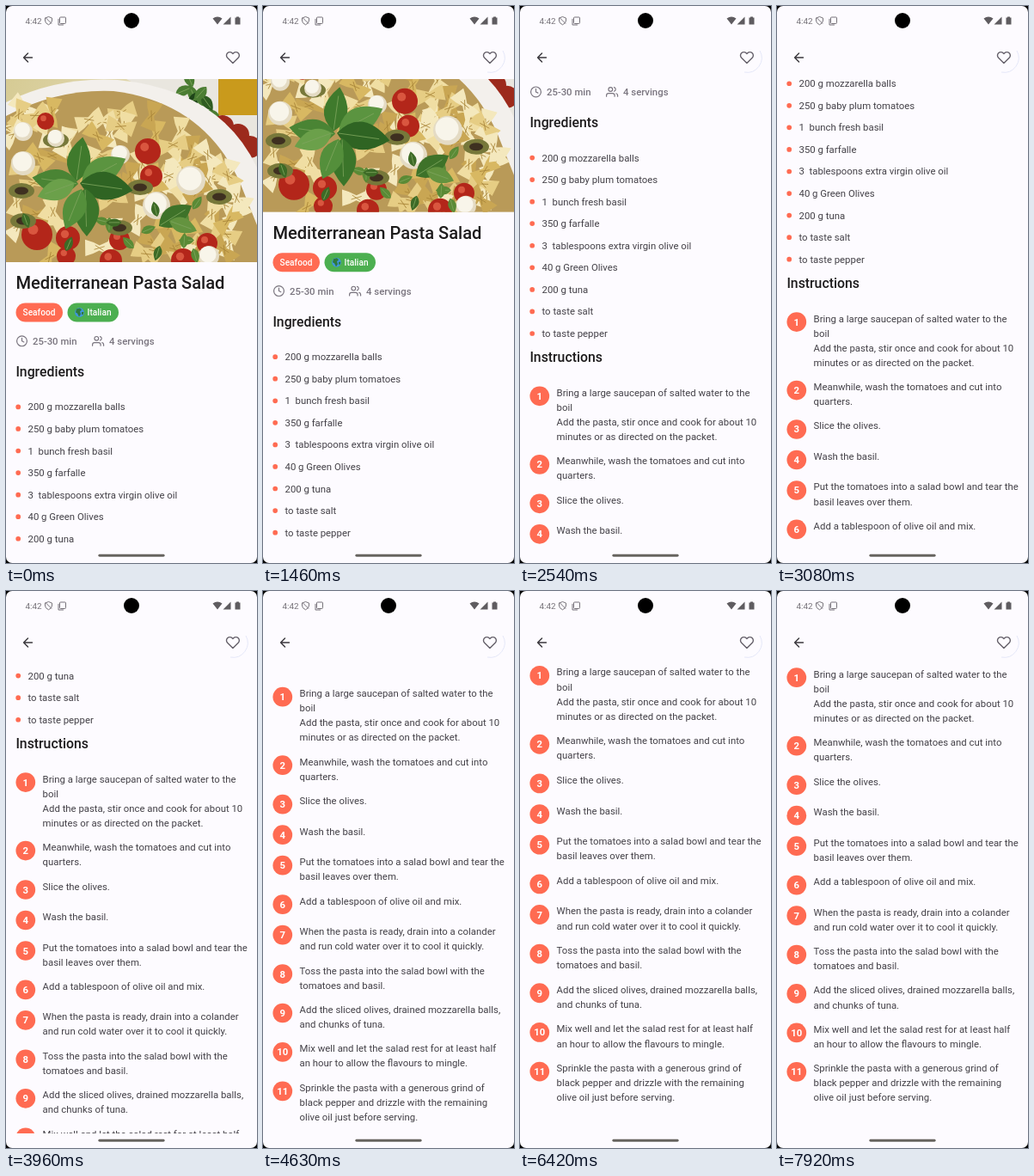
Animation, 292 px wide and 648 px high, one loop 8000 ms. Source, as an HTML page:

```html
<!DOCTYPE html>
<html lang="en">
<head>
<meta charset="utf-8">
<title>Recipe scroll</title>
<style>
  html, body { margin: 0; width: 100%; height: 100%; overflow: hidden; background: #000; }
  svg { display: block; font-family: Roboto, sans-serif; }
  text { font-size: 11.36px; fill: #434047; white-space: pre; }
  .title { font-size: 20.1px; font-weight: 500; fill: #1d1b1c; }
  .head { font-size: 15.8px; font-weight: 500; fill: #1d1b1c; }
  .meta { font-weight: 500; fill: #79747e; }
  .badge { font-size: 10.1px; font-weight: 500; fill: #fff; }
  .num { font-weight: 700; fill: #fff; text-anchor: middle; }
  .clock { font-size: 9.94px; fill: #77737a; }
  .line { fill: none; stroke-width: 2; stroke-linecap: round; stroke-linejoin: round; }
</style>
</head>
<body>
<svg width="292" height="648" viewBox="0 0 292 648">
  <defs>
    <clipPath id="view"><rect y="85" width="292" height="546"/></clipPath>
    <clipPath id="frame"><rect y="85" width="292" height="213"/></clipPath>
    <linearGradient id="table" x2="1" y2=".3">
      <stop stop-color="#d6cb94"/><stop offset="1" stop-color="#ece5cf"/>
    </linearGradient>
  </defs>
  <rect width="292" height="648" rx="7" fill="#fdfbff"/>

  <g clip-path="url(#view)"><g id="page">
    <g id="photo" clip-path="url(#frame)"></g>
    <text class="title" x="11.4" y="329">Mediterranean Pasta Salad</text>
    <rect x="11.5" y="345.5" width="54.5" height="22" rx="11" fill="#ff6b52"/>
    <text class="badge" x="19.6" y="360">Seafood</text>
    <rect x="71.5" y="345.5" width="59.5" height="22" rx="11" fill="#4caf50"/>
    <circle cx="85.5" cy="356.5" r="5.4" fill="#3f95dc"/>
    <path d="M82 352.5l4-1 2 2-2 2 1 3-2 3-2-4-2-1zM88 356l2.5 0-1 3-1.5 0z" fill="#2f7a3c"/>
    <text class="badge" x="94.6" y="360">Italian</text>
    <g class="line" stroke="#79747e" transform="translate(11.4 382.7) scale(.592)">
      <circle cx="12" cy="12" r="10"/><path d="M12 6v6l4 2"/>
    </g>
    <text class="meta" x="31" y="394">25-30 min</text>
    <g class="line" stroke="#79747e" transform="translate(100 382.7) scale(.592)">
      <path d="M17 21v-2a4 4 0 0 0-4-4H5a4 4 0 0 0-4 4v2M23 21v-2a4 4 0 0 0-3-3.87M16 3.13a4 4 0 0 1 0 7.75"/>
      <circle cx="9" cy="7" r="4"/>
    </g>
    <text class="meta" x="120" y="394">4 servings</text>
    <text class="head" x="11.4" y="431">Ingredients</text>
    <text class="head" x="11.4" y="704">Instructions</text>
  </g></g>

  <text class="clock" x="22.5" y="21">4:42</text>
  <g fill="none" stroke="#77737a">
    <path d="M49.5 12.5l4 1.5v3q0 3-4 4.8-4-1.8-4-4.8v-3zM46 13.5l7 7"/>
    <rect x="62.5" y="13" width="7" height="7.5" rx="1"/><path d="M61 15v7h6"/>
  </g>
  <circle cx="146" cy="17" r="9"/>
  <path d="M240.5 14.5q5.5-4 11 0l-5.5 7zM261.5 12.5v9h-9zM266.5 13.5h1.5v-1h3v1h1.5v8h-6z" fill="#5f5c60"/>
  <path class="line" stroke="#3a373d" transform="translate(17 51.5) scale(.71)" d="M19 12H5M12 19l-7-7 7-7"/>
  <path id="halo" d="M279 52a17 17 0 0 1-18 25" fill="none" stroke="#dfe3f6" stroke-width=".8"/>
  <path class="line" stroke="#66616b" transform="translate(255.4 51.5) scale(.71)"
    d="M20.84 4.61a5.5 5.5 0 0 0-7.78 0L12 5.67l-1.06-1.06a5.5 5.5 0 0 0-7.78 7.78L12 21.23l8.84-8.84a5.5 5.5 0 0 0 0-7.78z"/>
  <rect x="107.4" y="637.8" width="77.2" height="2.9" rx="1.4" fill="#67645f"/>
</svg>

<script>
const page = document.getElementById('page');
const photo = document.getElementById('photo');
const halo = document.getElementById('halo');
const CORAL = '#ff6b52';

const add = (parent, markup) => parent.insertAdjacentHTML('beforeend', markup);
const dot = (x, y, r, fill) => `<circle cx="${x}" cy="${y}" r="${r}" fill="${fill}"/>`;
const label = (x, y, text, cls = '') => `<text class="${cls}" x="${x}" y="${y}">${text}</text>`;

// Ingredients
['200 g mozzarella balls', '250 g baby plum tomatoes', '1\u00a0 bunch fresh basil',
 '350 g farfalle', '3\u00a0 tablespoons extra virgin olive oil', '40 g Green Olives',
 '200 g tuna', 'to taste salt', 'to taste pepper'].forEach((item, i) => {
  const y = 466.4 + i * 25.56;
  add(page, dot(14.2, y, 2.85, CORAL) + label(25.5, y + 4, item));
});

// Numbered steps; each is as tall as its text or its badge
let stepY = 739.7;
['Bring a large saucepan of salted water to the|boil|Add the pasta, stir once and cook for about 10|minutes or as directed on the packet.',
 'Meanwhile, wash the tomatoes and cut into|quarters.',
 'Slice the olives.',
 'Wash the basil.',
 'Put the tomatoes into a salad bowl and tear the|basil leaves over them.',
 'Add a tablespoon of olive oil and mix.',
 'When the pasta is ready, drain into a colander|and run cold water over it to cool it quickly.',
 'Toss the pasta into the salad bowl with the|tomatoes and basil.',
 'Add the sliced olives, drained mozzarella balls,|and chunks of tuna.',
 'Mix well and let the salad rest for at least half|an hour to allow the flavours to mingle.',
 'Sprinkle the pasta with a generous grind of|black pepper and drizzle with the remaining|olive oil just before serving.'
].forEach((step, i) => {
  const lines = step.split('|');
  add(page, dot(22.8, stepY + 4, 11.36, CORAL) + label(22.8, stepY + 8, i + 1, 'num'));
  lines.forEach((line, k) => add(page, label(42.6, stepY + 4 + k * 17.04, line)));
  stepY += Math.max(lines.length * 17.04, 24.14) + 11.36;
});

// Salad picture in flat shapes
let seed = 7;
const rnd = () => (seed = seed * 16807 % 2147483647) / 2147483647;
const pick = list => list[Math.floor(rnd() * list.length)];
const leaf = (x, y, len, angle, fill) =>
  `<g transform="translate(${x} ${y}) rotate(${angle})"><path d="M0 0Q${len * .4} ${-len * .55} ${len} 0Q${len * .4} ${len * .5} 0 0" fill="${fill}"/>
   <path d="M2 0H${len * .8}" stroke="#7da45c" stroke-width=".8"/></g>`;

add(photo, `<rect y="85" width="292" height="213" fill="url(#table)"/>
  <path d="M140 85h152v110l-60-60z" fill="#e9e6df"/>
  <rect x="247" y="85" width="45" height="42" fill="#c99a1c"/>`);
for (let i = 0; i < 16; i++)
  add(photo, leaf(165 + rnd() * 75, 92 + rnd() * 36, 22, rnd() * 360, pick(['#2f5c22', '#4b7d33', '#1f4519'])));
[[252, 140], [270, 150], [284, 164], [262, 162]].forEach(([x, y]) => add(photo, dot(x, y, 13, '#9c2a1c')));
add(photo, `<path d="M0 298V112Q60 82 130 86Q250 98 292 188V298z" fill="#f3f0ec"/>
  <path d="M0 298V128Q60 96 125 99Q230 112 272 205L292 255V298z" fill="#b99a58"/>
  <g id="bowl"></g>`);

const bowl = document.getElementById('bowl');
for (let i = 0; i < 95; i++) {
  const x = rnd() * 270, low = 118 + Math.max(0, x - 130) ** 2 * .0045;
  const y = low + rnd() * (298 - low);
  const fill = pick(['#e6cd84', '#f0dea3', '#d8b862', '#f4e8bd', '#c9a653']);
  add(bowl, `<g transform="translate(${x} ${y}) rotate(${rnd() * 180})">
    <path d="M-17-9Q-8-7 0-3Q8-8 17-10L15 9Q7 6 0 3Q-8 8-16 10z" fill="${fill}"/>
    <path d="M-5-3L5 3M-6 2L6-2" stroke="#a98538" stroke-width=".8"/></g>`);
}
[[165, 169, 15], [169, 198, 13], [36, 266, 18], [72, 270, 14], [46, 134, 10], [132, 272, 12],
 [206, 296, 14], [234, 276, 12], [122, 296, 13], [70, 291, 11]].forEach(([x, y, r]) =>
  add(bowl, dot(x, y, r, '#b3261a') + dot(x - r / 4, y - r / 3, r / 3, '#d9563f')));
[[20, 250], [156, 211], [248, 222], [58, 156], [132, 258], [18, 215]].forEach(([x, y]) =>
  add(bowl, `<ellipse cx="${x}" cy="${y}" rx="15" ry="9" fill="#77783a"/><ellipse cx="${x}" cy="${y}" rx="8" ry="4.5" fill="#3e3020"/>`));
[[20, 183, 14], [58, 154, 10], [175, 232, 16], [215, 203, 17], [133, 173, 11], [20, 146, 11], [236, 291, 12]].forEach(([x, y, r]) =>
  add(bowl, dot(x, y, r, '#e4dbc4') + dot(x - 1, y - 2, r * .8, '#f8f5ea')));
for (let i = 0; i < 14; i++)
  add(bowl, leaf(10 + rnd() * 240, 225 + rnd() * 70, 18, rnd() * 360, pick(['#3d6a26', '#5a8a35'])));
[[82, 204, 52, -82, '#3f7a2c'], [88, 205, 58, -28, '#5b9440'], [84, 207, 54, -172, '#4a8434'],
 [86, 206, 62, 8, '#2f6423'], [80, 206, 46, 160, '#6ba04a'], [92, 212, 56, 88, '#3b752a'],
 [88, 213, 50, 112, '#548f3b'], [178, 256, 45, -32, '#3e7229'], [190, 250, 34, 20, '#64933f']]
  .forEach(args => add(bowl, leaf(...args)));

// Scroll path: [time, offset, speed], joined by Hermite curves
const PATH = [[0, 0, 0], [1150, 0, 0], [1460, 58, .24], [1830, 153, .23],
  [3080, 376, .16], [3960, 521, .15], [5000, 643, 0], [8000, 643, 0]];
function scrollAt(t) {
  const i = PATH.findIndex(p => p[0] > t);
  const [t0, y0, v0] = PATH[i - 1], [t1, y1, v1] = PATH[i];
  const d = t1 - t0, p = (t - t0) / d, q = 1 - p;
  return y0 * q * q * (1 + 2 * p) + v0 * d * p * q * q
       + y1 * p * p * (3 - 2 * p) - v1 * d * p * p * q;
}

// Overscroll pulls: [start, peak, end, amount]
const PULLS = [[4960, 5200, 5790, .0072], [6040, 6300, 6830, .005], [7330, 7500, 7900, .004]];
const ease = p => p * p * (3 - 2 * p);
function stretchAt(t) {
  const pull = PULLS.find(([a, , c]) => t > a && t < c);
  if (!pull) return 1;
  const [a, b, c, amount] = pull;
  return 1 + amount * ease(t < b ? (t - a) / (b - a) : (c - t) / (c - b));
}

const start = performance.now();
function draw(now) {
  const t = Math.max(0, now - start) % 8000;
  const s = stretchAt(t);
  page.setAttribute('transform', `translate(0 ${631 * (1 - s)}) scale(1 ${s}) translate(0 ${-scrollAt(t)})`);
  halo.setAttribute('opacity', t < 40 ? 0 : 1);
  requestAnimationFrame(draw);
}
draw(start);
</script>
</body>
</html>
```
